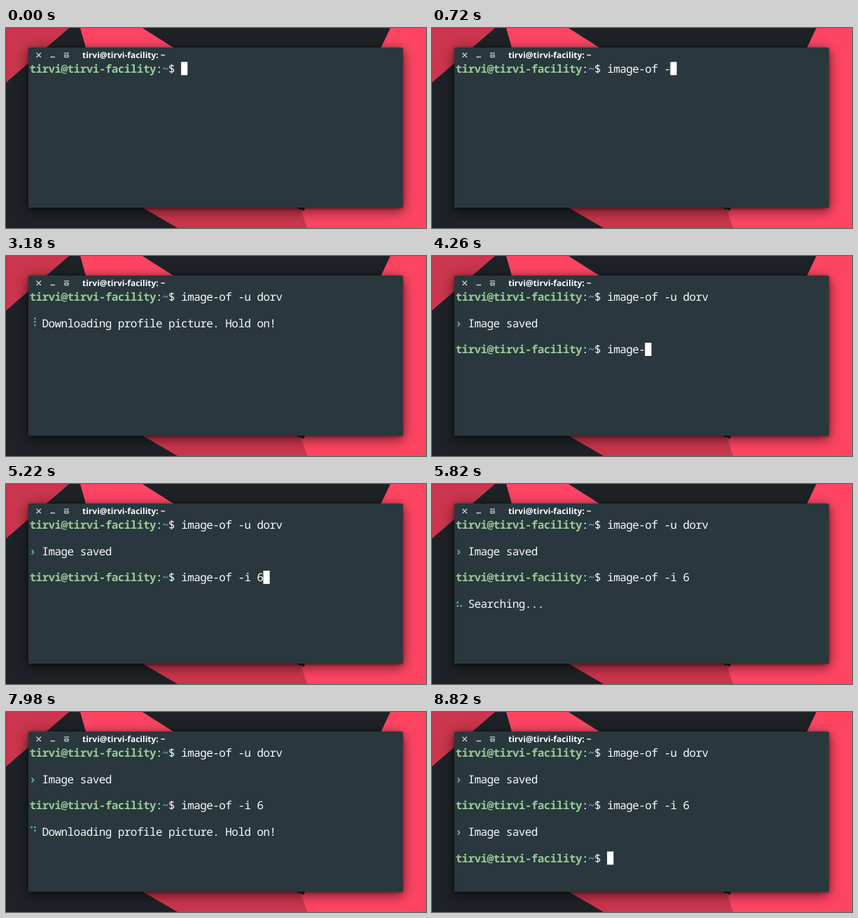
Write an HTML page that moves like this. It is 600 px wide and 286 px high and loops after 9000 ms.

```html
<!DOCTYPE html>
<html lang="en">
<head>
<meta charset="utf-8">
<title>Terminal session</title>
<style>
  html, body { margin: 0; width: 100%; height: 100%; overflow: hidden; background: #1e2226; }
  svg { display: block; width: 100vw; height: 100vh; }
  text { white-space: pre; text-rendering: geometricPrecision; }
  .window { fill: #29383c; filter: drop-shadow(0 1px 2px rgba(0, 0, 0, .4)) drop-shadow(0 4px 9px rgba(0, 0, 0, .6)); }
  .title { font: 700 12px "Open Sans", sans-serif; fill: #fff; }
  .icons { fill: none; stroke: #c9d0d0; stroke-width: 1.3; }
  #screen { font: 500 16px "Noto Sans Mono", monospace; letter-spacing: -.57px; fill: #f8fafa; }
  #screen .user { font-weight: 700; fill: #98c998; }
  #screen .path { font-weight: 700; fill: #549fdc; }
  .accent { font-weight: 700; fill: #62a9ad; }
  #cursor { fill: #fff; }
</style>
</head>
<body>
<svg viewBox="0 0 600 286" preserveAspectRatio="none">
  <rect width="600" height="286" fill="#1e2226"/>
  <path fill="#cb364c" d="M0 0H90L0 78ZM180 248L245 286H430L425 262L300 200Z"/>
  <path fill="#ff4563" d="M106 0H195L239 28L300 67L125 67Z"/>
  <path fill="#ff4563" d="M549 0H600V286H430L421 258L425 262Z"/>
  <path class="window" d="M32 257V30q0-2 2-2H565q2 0 2 2V257Z"/>
  <path class="icons" d="M43.5 35.5l6.5 6.5m0-6.5l-6.5 6.5M63.5 41.5h6.5M82.8 35.8h7.2M84 38.6h5v3h-5z"/>
  <text class="title" x="109" y="42.5">tirvi@tirvi-facility: ~</text>
  <g id="screen"></g>
  <rect id="cursor" width="9.2" height="18.9"/>
</svg>
<script>
const LOOP = 9000, TICK = 60, SPIN = 48;
const LEFT = 33.4, TOP = 48.5, CELL = 9.03, LINE = 18.87, PROMPT_COLS = 24;
// Braille dots 1-6 run down the left column, then down the right one.
const SPINNER = ["124", "145", "1456", "456", "3456", "356", "236", "1236", "123", "1234"];

// keys: the time at which each character of the command appears
const sessions = [
  { row: 0, prompt: 0, command: "image-of -u dorv",
    keys: [60, 120, 180, 240, 300, 360, 480, 540, 600, 720, 780, 900, 1140, 1200, 1260, 1380],
    enter: 1440, search: 1590, fetch: 2820, saved: 3720 },
  { row: 4, prompt: 3780, command: "image-of -i 6",
    keys: [4020, 4080, 4140, 4200, 4200, 4260, 4380, 4440, 4500, 4620, 4800, 4920, 5220],
    enter: 5340, search: 5500, fetch: 6600, saved: 8100 },
  { row: 8, prompt: 8160, command: "", keys: [], enter: Infinity, search: Infinity }
];

const screen = document.getElementById("screen");
const cursor = document.getElementById("cursor");
const rowTop = row => TOP + row * LINE;
const colLeft = col => LEFT + col * CELL;

function add(parent, tag, attrs, content = "") {
  const node = document.createElementNS("http://www.w3.org/2000/svg", tag);
  for (const name in attrs) node.setAttribute(name, attrs[name]);
  node.textContent = content;
  return parent.appendChild(node);
}

function addText(row, col) {
  return add(screen, "text", { x: colLeft(col), y: rowTop(row) + 15.3 });
}

function show(node, visible) {
  node.style.display = visible ? "" : "none";
}

for (const s of sessions) {
  s.line = addText(s.row, 0);
  add(s.line, "tspan", { class: "user" }, "tirvi@tirvi-facility");
  add(s.line, "tspan", {}, ":");
  add(s.line, "tspan", { class: "path" }, "~");
  add(s.line, "tspan", {}, "$ ");
  s.typed = add(s.line, "tspan", {});
  s.status = addText(s.row + 2, 2);
  s.arrow = addText(s.row + 2, 0);
  s.arrow.setAttribute("class", "accent");
  s.arrow.textContent = "›";
  s.dots = Array.from({ length: 6 }, (_, i) => add(screen, "circle", {
    class: "accent", r: 1.4,
    cx: LEFT + (i < 3 ? 3.2 : 8),
    cy: rowTop(s.row + 2) + 3.2 + (i % 3) * 4.8
  }));
}

function statusAt(s, t) {
  if (t < s.search) return "";
  if (t < s.fetch) return "Searching...";
  return t < s.saved ? "Downloading profile picture. Hold on!" : "Image saved";
}

function placeCursor(s, count, t) {
  const entered = t >= s.enter;
  const blinkedOff = t >= 8460 && t < 8820;
  cursor.setAttribute("x", colLeft(entered ? 0 : PROMPT_COLS + count));
  cursor.setAttribute("y", rowTop(s.row + (entered ? 1 : 0)));
  show(cursor, t < s.search && !blinkedOff);
}

function render(t) {
  for (const s of sessions) {
    const active = t >= s.prompt;
    const count = s.keys.filter(key => key <= t).length;
    const spinning = t >= s.search && t < s.saved;
    const pattern = spinning ? SPINNER[Math.floor((t - s.search) / SPIN) % SPINNER.length] : "";
    show(s.line, active);
    show(s.arrow, t >= s.saved);
    s.typed.textContent = s.command.slice(0, count);
    s.status.textContent = statusAt(s, t);
    s.dots.forEach((dot, i) => show(dot, pattern.includes(i + 1)));
    if (active) placeCursor(s, count, t);
  }
}

const began = performance.now();
function frame() {
  const t = (performance.now() - began) % LOOP;
  render(Math.floor(t / TICK) * TICK);
  requestAnimationFrame(frame);
}
frame();
</script>
</body>
</html>
```
